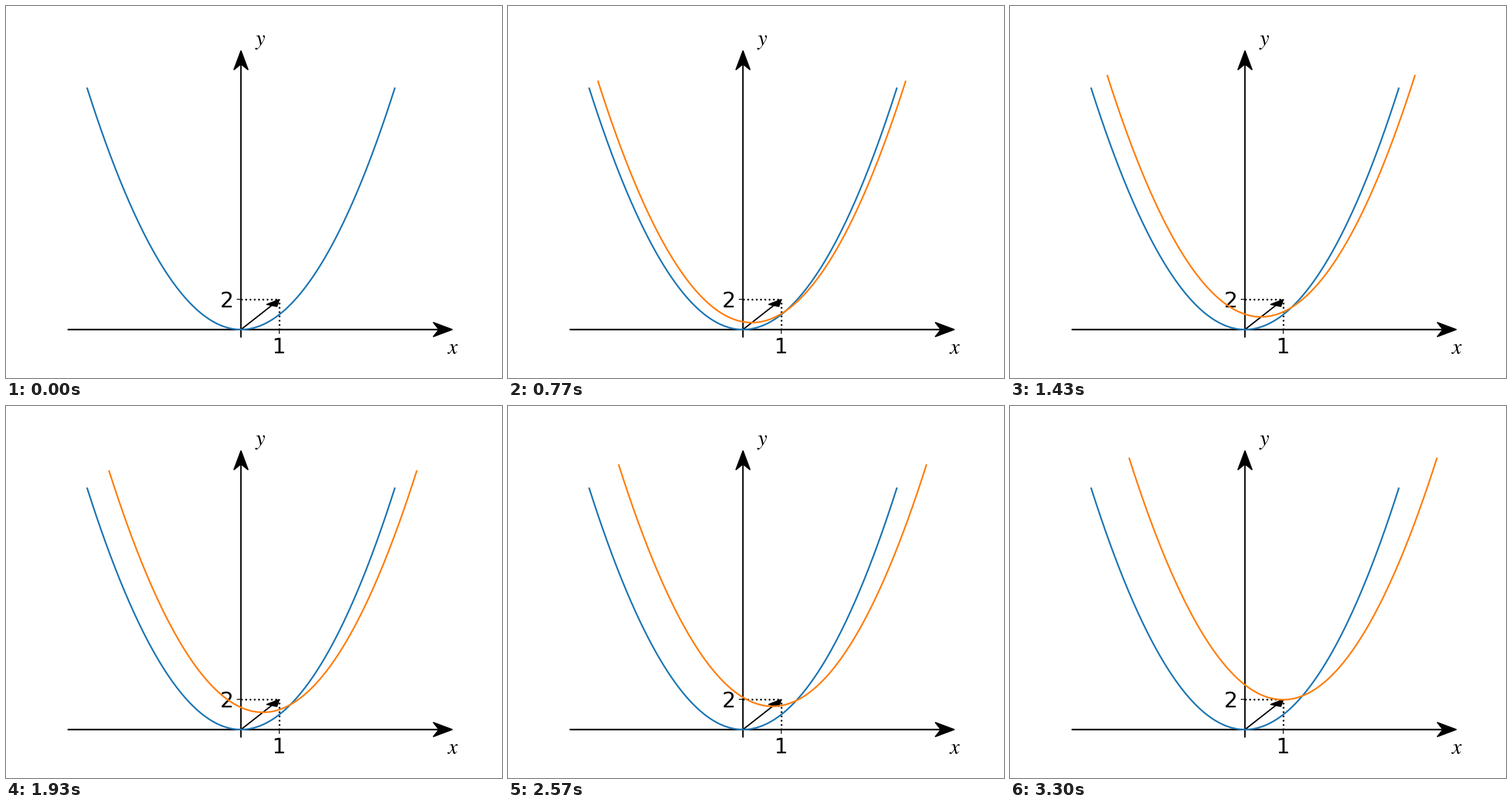
Recreate the animation shown at these times as a matplotlib script. Size 864 by 648 pixels, loop 3330 ms.

```python
import numpy as np
import matplotlib.pyplot as plt
from matplotlib.animation import FuncAnimation

plt.rcParams["mathtext.fontset"] = "stix"

FRAMES = 100
LOOP_MS = 3330
X_LIM = (-4.5, 5.5)
Y_LIM = (-0.5, 18.5)
SHIFT = (1, 2)

fig = plt.figure(figsize=(6.4, 4.8), dpi=135, facecolor="white")
ax = fig.add_axes([0.125, 0.11, 0.775, 0.77])
ax.set_xlim(*X_LIM)
ax.set_ylim(*Y_LIM)

# Ticks sit on the hidden spines that cross at the origin.
for side in ("right", "top"):
    ax.spines[side].set_visible(False)
for side in ("left", "bottom"):
    ax.spines[side].set_position("zero")
    ax.spines[side].set_color("none")
ax.set_xticks([SHIFT[0]])
ax.set_yticks([SHIFT[1]])
ax.tick_params(labelsize=20)


def draw_axes():
    """Draw both axis arrows with heads of equal size on screen."""
    x0, x1 = X_LIM
    y0, y1 = Y_LIM
    box = ax.get_window_extent()
    aspect = box.height / box.width
    head_w, head_l = (y1 - y0) / 20, (x1 - x0) / 20
    style = dict(fc="k", ec="k", lw=1, overhang=0.3,
                 length_includes_head=True, clip_on=False)
    ax.arrow(x0, 0, x1 - x0, 0, head_width=head_w, head_length=head_l, **style)
    ax.arrow(0, y0, 0, y1 - y0, head_width=head_l * aspect,
             head_length=head_w / aspect, **style)


def axis_name(text, px, py):
    """Place an axis name by its centre and baseline in pixels from the top."""
    fig.text(px / 864, 1 - py / 648, text, fontsize=20,
             ha="center", va="baseline")


draw_axes()
axis_name("$x$", 777.6, 606)
axis_name("$y$", 443, 68)

# Shift vector and its guide lines
ax.arrow(0, 0, *SHIFT, head_width=0.3, length_includes_head=True,
         fc="k", ec="k", lw=1)
ax.plot([0, SHIFT[0]], [SHIFT[1], SHIFT[1]], "k:")
ax.plot([SHIFT[0], SHIFT[0]], [0, SHIFT[1]], "k:")

x = np.linspace(-4, 4, 200)
y = x ** 2
ax.plot(x, y, color="tab:blue")
moving, = ax.plot([], [], color="tab:orange")


def update(i):
    t = i / FRAMES
    moving.set_data(x + SHIFT[0] * t, y + SHIFT[1] * t)
    moving.set_visible(i > 0)
    return moving,


anim = FuncAnimation(fig, update, frames=FRAMES, interval=LOOP_MS / FRAMES,
                     repeat=True, repeat_delay=0)
plt.show()
```
